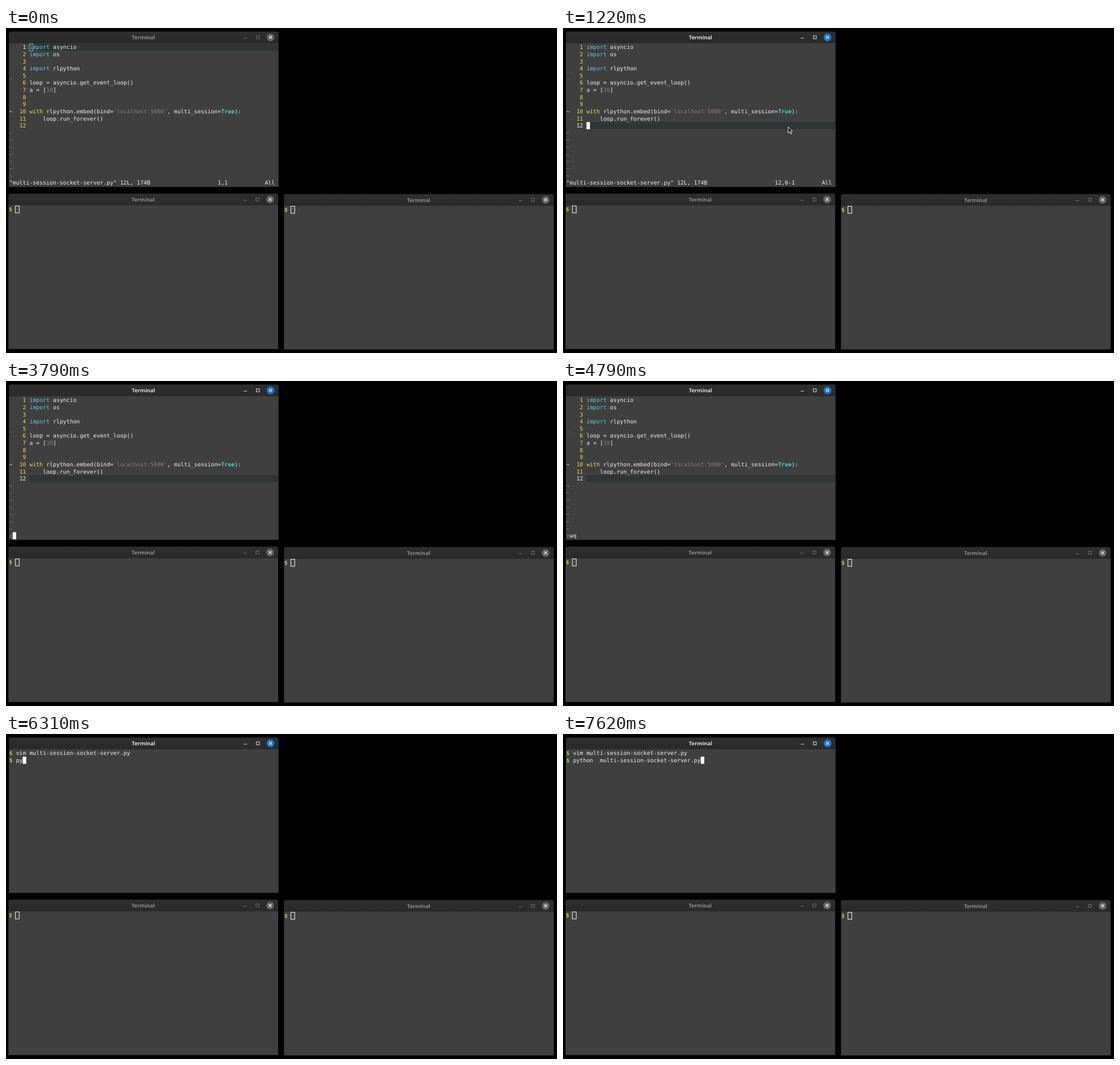
An HTML page with a canvas for the animation above (8 s loop, 974 by 575 pixels).

```html
<!DOCTYPE html>
<html>
<head>
<meta charset="utf-8">
<style>
html, body { margin: 0; width: 100%; height: 100%; overflow: hidden; background: #000; }
canvas { display: block; }
</style>
</head>
<body>
<canvas id="stage" width="974" height="575"></canvas>
<script>
const ctx = document.getElementById('stage').getContext('2d');
const LOOP = 8000, CELL_W = 5.942, CELL_H = 12.63;
const BG = '#3f3f3f', FG = '#f0f0ee', YELLOW = '#ece04c', CYAN = '#5cc9e6',
  PURPLE = '#94758f', TEAL = '#3be0e0', GREEN = '#8ae234', GREY = '#80868a', BLUE = '#4f8fb5';
const FILE = 'multi-session-socket-server.py';

// Each line is a list of text and colour pairs
const CODE = [
  ['import', CYAN, ' asyncio', FG],
  ['import', CYAN, ' os', FG],
  [],
  ['import', CYAN, ' rlpython', FG],
  [],
  ['loop = asyncio.get_event_loop()', FG],
  ['a = [', FG, '10', PURPLE, ']', FG],
  [],
  [],
  ['with', YELLOW, ' rlpython.embed(bind=', FG, "'localhost:5000'", PURPLE,
    ', multi_session=', FG, 'True', TEAL, '):', FG],
  ['    loop.run_forever()', FG],
  []
];

// Shell input by time
const TYPED = [[6160, 'p'], [6310, 'py'], [6480, 'pyt'], [6560, 'pyth'], [6640, 'pytho'],
  [6810, 'python'], [7120, 'python '], [7620, 'python  ' + FILE]];
const COMMAND = [[3790, ':'], [4030, ':w'], [4100, ':wq']];
const HIDDEN = [[1800, 2370], [2950, 3370], [4790, 5060], [5600, 6090]];

const latest = (steps, t) => steps.reduce((now, [at, s]) => t >= at ? s : now, '');

function rect(x, y, w, h, color) {
  ctx.fillStyle = color;
  ctx.fillRect(x, y, w, h);
}

function text(col, row, str, color, bold) {
  ctx.font = (bold ? 'bold ' : '') + '9.87px "DejaVu Sans Mono", monospace';
  ctx.textAlign = 'left';
  ctx.fillStyle = color;
  ctx.fillText(str, col * CELL_W, row * CELL_H + 9.75);
}

function cursor(col, row, solid, color = '#fff') {
  const x = col * CELL_W, y = row * CELL_H;
  if (solid) return rect(x, y, CELL_W + .3, CELL_H, color);
  ctx.strokeStyle = color;
  ctx.lineWidth = 1;
  ctx.strokeRect(x - .3, y + .4, CELL_W + .7, CELL_H - .2);
}

function prompt(row, str) {
  text(0, row, '$', GREEN, true);
  text(2, row, str, FG);
}

// Draws the frame and its contents, whose origin is the first text cell
function terminal(x, y, focused, content) {
  ctx.save();
  ctx.translate(x, y);
  rect(0, 20, 476.7, 255, BG);
  const shade = ctx.createLinearGradient(0, 0, 0, 21);
  shade.addColorStop(0, '#2f2f2f');
  shade.addColorStop(1, '#292929');
  ctx.fillStyle = shade;
  ctx.beginPath();
  ctx.roundRect(0, 0, 476.7, 20.7, [4, 4, 0, 0]);
  ctx.fill();

  ctx.font = 'bold 9.3px "Noto Sans", sans-serif';
  ctx.textAlign = 'center';
  ctx.fillStyle = focused ? '#dedede' : '#8c8c8c';
  ctx.fillText('Terminal', 238, 14);

  const icon = focused ? '#e0e0e0' : '#747474';
  rect(415, 11.3, 6, 1, icon);
  ctx.strokeStyle = icon;
  ctx.lineWidth = 1;
  ctx.strokeRect(437.5, 7.7, 5.2, 5.2);

  ctx.fillStyle = focused ? '#1079dc' : '#636363';
  ctx.beginPath();
  ctx.arc(462.5, 10.4, 6.8, 0, 7);
  ctx.fill();
  ctx.strokeStyle = '#f4f4f4';
  ctx.lineWidth = 1.2;
  ctx.beginPath();
  ctx.moveTo(459.9, 7.8);
  ctx.lineTo(465.1, 13);
  ctx.moveTo(465.1, 7.8);
  ctx.lineTo(459.9, 13);
  ctx.stroke();

  ctx.translate(.7, 21.3);
  content();
  ctx.restore();
}

function editor(t, cursorOn) {
  const focused = t >= 1150, line = t < 1220 ? 0 : 11;
  rect(6 * CELL_W, line * CELL_H, 440, CELL_H, '#2d3635');
  text(0, 4, '_', GREY);
  text(0, 9, '~', FG);
  CODE.forEach((parts, row) => {
    text(3, row, String(row + 1).padStart(2), row === line ? FG : YELLOW);
    for (let i = 0, col = 6; i < parts.length; i += 2) {
      text(col, row, parts[i], parts[i + 1], parts[i] === 'True');
      col += parts[i].length;
    }
  });
  for (let row = 12; row < 19; row++) text(0, row, '~', row === 14 || row === 15 ? BLUE : GREY);

  const command = latest(COMMAND, t);
  if (command) {
    text(0, 19, command, FG);
    if (cursorOn) cursor(command.length, 19, true);
    return;
  }
  text(0, 19, `"${FILE}" 12L, 174B`, FG);
  text(62, 19, line ? '12,0-1' : '1,1', FG);
  text(76, 19, 'All', FG);
  if (!cursorOn) return;
  cursor(6, line, focused, line ? '#fff' : CYAN);
  if (focused && !line) text(6, 0, 'i', BG);
}

function shell(t, cursorOn) {
  const typed = latest(TYPED, t);
  prompt(0, 'vim ' + FILE);
  prompt(1, typed);
  if (cursorOn) cursor(2 + typed.length, 1, true);
}

function idle() {
  prompt(0, '');
  cursor(2, 0, false);
}

function pointer(t) {
  if (t < 500 || t >= 3370) return;
  const step = Math.min(4, Math.floor((t - 500) / 77.5));
  const left = (1 - step / 4) ** 1.5;
  ctx.save();
  ctx.translate(398 + 438 * left, 174.8 + 68 * left);
  ctx.beginPath();
  for (const [x, y] of [[0, 0], [0, 11], [2.5, 8.8], [4.4, 13], [6.2, 12.2], [4.4, 8.2], [7.6, 7.8]])
    ctx.lineTo(x, y);
  ctx.closePath();
  ctx.fillStyle = '#1c1c1c';
  ctx.strokeStyle = '#f2f2f2';
  ctx.lineWidth = 1;
  ctx.fill();
  ctx.stroke();
  ctx.restore();
}

function draw(t) {
  const cursorOn = !HIDDEN.some(([from, to]) => t >= from && t < to);
  rect(0, 0, 974, 575, '#000');
  terminal(5.1, 6.2, t >= 1150, () => (t < 5060 ? editor : shell)(t, cursorOn));
  terminal(4.4, 293, false, idle);
  terminal(491.4, 293.7, false, idle);
  pointer(t);
}

ctx.textRendering = 'geometricPrecision';
const start = performance.now();
function tick() {
  draw((performance.now() - start) % LOOP);
  requestAnimationFrame(tick);
}
tick();
</script>
</body>
</html>
```
